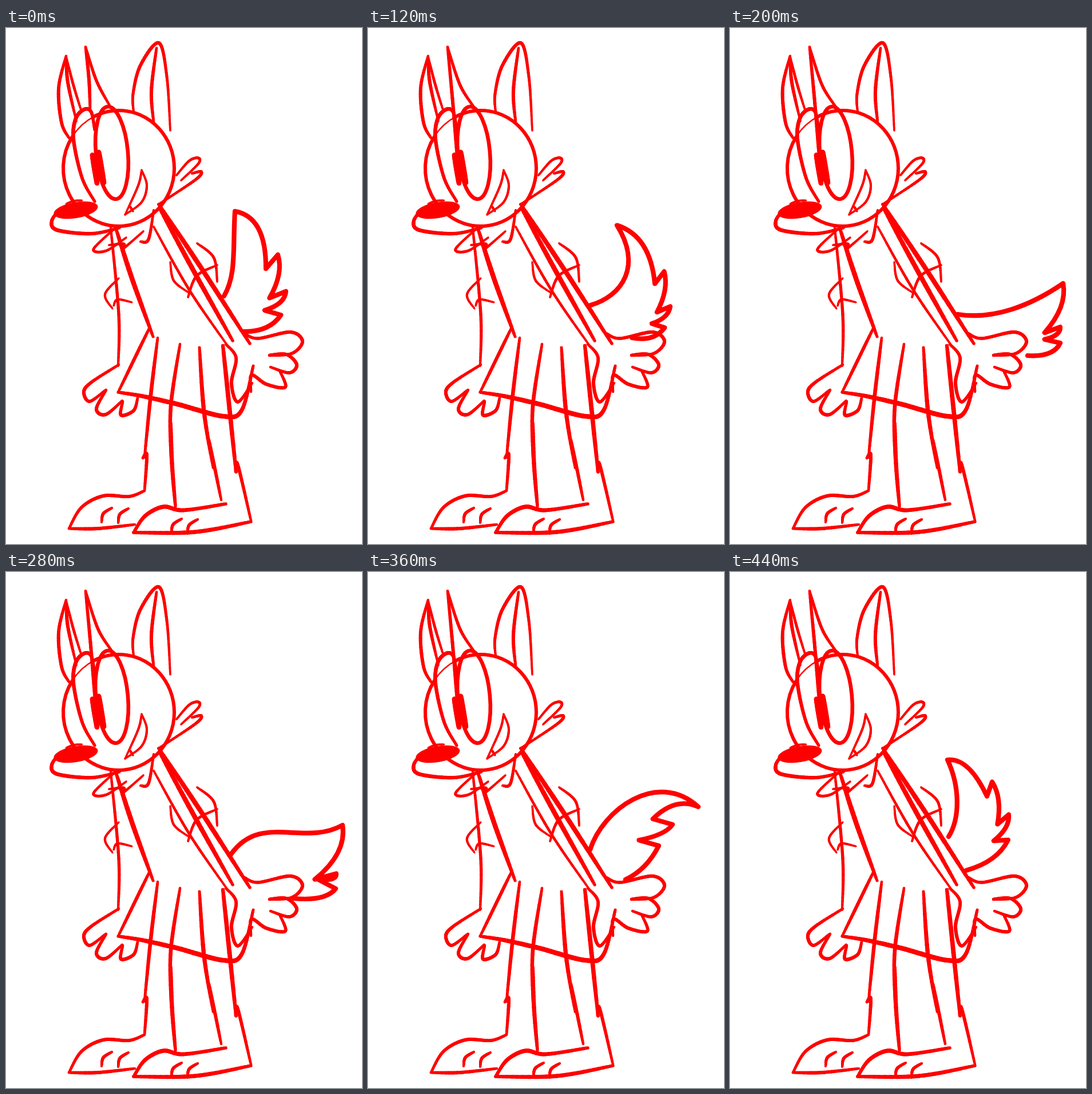
An HTML page with a canvas that plays this animation: 622x901 px, repeating every 480 ms.

```html
<!DOCTYPE html>
<html lang="en">
<head>
<meta charset="utf-8">
<title>Tail wag sketch</title>
<style>
html, body { margin: 0; width: 100%; height: 100%; overflow: hidden; background: #fff; }
canvas { display: block; width: 622px; height: 901px; }
</style>
</head>
<body>
<canvas id="stage" width="622" height="901"></canvas>
<script>
const ctx = document.getElementById('stage').getContext('2d');
ctx.strokeStyle = ctx.fillStyle = '#f00';
ctx.lineCap = ctx.lineJoin = 'round';

const WEIGHT = 1.2;
const parse = text => text.split(' ').map(p => p.split(',').map(Number));

const spline = (a, b, c, d, t) =>
  0.5 * (2 * b + (c - a) * t + (2 * a - 5 * b + 4 * c - d) * t * t + (3 * b - a - 3 * c + d) * t * t * t);

// Brush stroke through a few points, thinner toward both ends.
function ink(text, width = 5, ends = 0.75) {
  const pts = parse(text), n = pts.length - 1, sub = 12;
  const at = i => pts[Math.max(0, Math.min(n, i))];
  let last = pts[0];
  for (let k = 1; k <= n * sub; k++) {
    const i = Math.min(n - 1, Math.floor(k / sub)), t = k / sub - i;
    const next = [0, 1].map(j => spline(at(i - 1)[j], at(i)[j], at(i + 1)[j], at(i + 2)[j], t));
    ctx.lineWidth = WEIGHT * width * (ends + (1 - ends) * Math.sin(Math.PI * k / (n * sub)));
    ctx.beginPath();
    ctx.moveTo(...last);
    ctx.lineTo(...next);
    ctx.stroke();
    last = next;
  }
}

function oval(x, y, rx, ry, tilt, width, from = 0, to = 2 * Math.PI) {
  ctx.lineWidth = WEIGHT * width;
  ctx.beginPath();
  ctx.ellipse(x, y, rx, ry, tilt, from, to);
  width ? ctx.stroke() : ctx.fill();
}

function drawEars(late) {
  ink('105,49 92,105 97,165 110,192');
  ink('105,50 108,95 123,163', 5, 0.6);
  ink('105,50 117,97 131,143', 4);
  // the middle ear runs on into the eye in the later drawings
  ink(late ? '139,33 149,140 155,222' : '139,33 145,90 147,142');
  ink(late ? '139,33 161,100 188,142' : '139,33 158,92 182,137', 4.5);
  ink('223,147 222,115 235,65 267,26 281,85 287,179', 5, 0.6);
  ink('263,35 254,110 258,165');
}

function drawHead() {
  oval(197, 245, 97, 101, 0, 5, -2.05, 3.72);
  oval(197, 245, 97, 101, 0, 2, 3.72, 4.25);
  // eyes
  ink('155,178 149,147 137,142 122,158 118,195 133,262 155,303', 5.5);
  oval(185, 218, 28, 81, -0.09, 5.5);
  ink('151,222 159,271', 8, 0.9);
  ink('162,217 171,270', 8, 0.9);
  ink('157,226 164,262', 8, 1);
  // mouth and tooth
  ink('237,248 246,275 237,304 208,326', 3.5);
  ink('237,248 231,275 208,326', 3.5);
  ink('217,312 222,320', 3.5);
  // nose and muzzle
  oval(122, 318, 39, 14, -0.17, 0);
  ink('105,307 118,302 133,301', 3);
  ink('95,315 80,337 90,353 150,359 198,349', 5.5);
  // cheek tuft
  ink('298,257 320,232 336,227 336,237 306,266', 4);
  ink('325,254 341,251 331,265 268,307', 4.5);
}

function drawTorso() {
  // ruff
  ink('190,350 153,386 175,389 210,366', 4);
  ink('180,379 206,377 205,385 240,355', 4);
  ink('235,373 249,369 258,318', 4.5);
  // far arm and hand
  ink('183,349 197,500 196,590', 4.5);
  ink('197,437 173,465 186,490', 3.5);
  ink('188,485 195,474 220,479', 3.5);
  ink('197,588 150,618 136,635 146,652 173,633');
  ink('175,632 158,665 174,675 203,651');
  ink('204,652 201,676 223,668 230,646');
  // dress
  ink('192,350 220,437 257,539', 7, 0.6);
  ink('250,525 196,636');
  ink('196,636 239,643 300,657 380,678 412,667 432,590', 7, 0.6);
}

function drawNearArm() {
  ink('258,347 320,457 388,556', 4);
  ink('269,316 330,428 396,546', 7, 0.65);
  ink('267,308 345,425 426,551', 7, 0.65);
  ink('287,409 293,441 319,462', 3.5);
  ink('318,470 333,433 369,414', 4);
  ink('334,376 363,401 369,443', 4);
  ink('416,533 440,542 497,531 518,547 500,568 460,572');
  ink('460,571 490,570 508,588 495,602 462,592');
  ink('478,598 488,627 455,622 429,606 428,635');
  ink('384,552 402,576 394,620 405,653 430,620');
}

function drawLegs() {
  ink('265,541 253,640 242,750', 5.5, 0.65);
  ink('304,552 288,660 288,752', 5.5, 0.65);
  ink('338,558 346,670 362,768', 6, 0.65);
  ink('379,555 402,775', 6.5);
  ink('239,751 246,746 242,808');
  ink('288,690 290,760 296,835', 6);
  ink('355,720 376,824');
  ink('401,775 405,763 428,860');
  // feet
  ink('242,808 215,818 170,817 132,837 110,874');
  ink('110,874 160,874 225,867');
  ink('384,831 310,842 275,836 243,852 223,881', 6);
  ink('223,881 330,880 428,862', 6);
  // toes: one short hook, repeated
  for (const [x, y] of [[185, 838], [214, 839], [307, 857], [335, 858]])
    ink([[0, 0], [-15, 10], [-18, 25]].map(([a, b]) => [x + a, y + b]).join(' '), 4.5);
}

// Tail keys: root, two handles, tip, then two handles and end of the back edge;
// depth of the tufts, bulge of the edge below the tip, number of tufts.
const keys = {};
const pose = (step, line, ...fur) => keys[step] = [...parse(line), fur];
pose(0, '381,468 403,430 396,385 400,320 470,318 552,540 415,530', 28, 18, 3);
pose(1, '388,480 430,435 450,390 406,318 457,297 615,545 415,537', 20, 15, 3);
pose(3, '390,488 460,500 508,440 464,371 601,408 534,593 508,545', 24, 8, 2);
pose(4, '398,500 460,510 525,485 582,446 554,516 620,577 520,572', 28, 15, 2);
pose(6, '393,493 445,420 520,480 588,442 547,530 630,576 503,570', 38, 20, 2);
pose(8, '388,485 410,415 505,345 577,410 539,392 506,516 450,537', 34, -28, 2);
pose(10, '382,462 402,430 402,375 380,328 419,287 585,480 413,521', 22, 5, 3);

function tailAt(step) {
  if (keys[step]) return keys[step];
  const next = keys[step + 1];
  return keys[step - 1].map((p, i) => p.map((v, j) => (v + next[i][j]) / 2));
}

function drawTail(step) {
  const [root, a, b, tip, c, d, end, [depth, bulge, tufts]] = tailAt(step);
  // point on the back edge, moved inward by some distance
  const edge = (t, inset = 0) => {
    const u = 1 - t;
    const [x, y] = [0, 1].map(j => u * u * u * tip[j] + 3 * u * u * t * c[j] + 3 * u * t * t * d[j] + t * t * t * end[j]);
    const [dx, dy] = [0, 1].map(j => u * u * (c[j] - tip[j]) + 2 * u * t * (d[j] - c[j]) + t * t * (end[j] - d[j]));
    const len = Math.hypot(dx, dy);
    return [x - dy / len * inset, y + dx / len * inset];
  };
  ctx.lineWidth = 8.2;
  ctx.beginPath();
  ctx.moveTo(...root);
  ctx.bezierCurveTo(...a, ...b, ...tip);
  let from = 0;
  for (const t of [0.4, 0.6, 0.75].slice(0, Math.ceil(tufts))) {
    ctx.quadraticCurveTo(...edge((from + t) / 2, from ? 0 : -bulge), ...edge(t + 0.05, depth));
    ctx.lineTo(...edge(t));
    from = t;
  }
  ctx.quadraticCurveTo(...edge((from + 1) / 2, -8), ...end);
  ctx.stroke();
}

function draw(step) {
  ctx.clearRect(0, 0, 622, 901);
  drawEars(step > 1);
  drawHead();
  drawTorso();
  drawLegs();
  drawTail(step);
  drawNearArm();
}

const LOOP = 480, BEAT = 40;
let shown = -1;
function tick() {
  // the first drawing holds for two beats
  const step = Math.max(0, Math.floor(performance.now() % LOOP / BEAT) - 1);
  if (step !== shown) draw(shown = step);
  requestAnimationFrame(tick);
}
tick();
</script>
</body>
</html>
```
